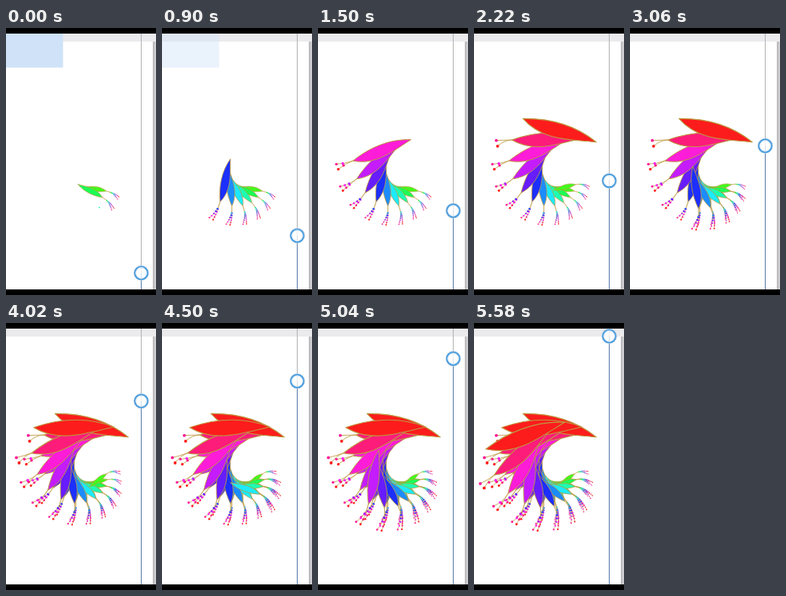
Recreate the animation shown at these times as an HTML page. Size 188 px wide and 334 px high, loop 5.64 s.

```html
<!DOCTYPE html>
<html lang="en">
<head>
<meta charset="utf-8">
<title>Feather spiral</title>
<style>
  html, body { margin: 0; width: 100%; height: 100%; overflow: hidden; background: #fff; }
  svg { display: block; width: 100vw; height: 100vh; }
</style>
</head>
<body>
<svg viewBox="0 0 188 334" preserveAspectRatio="none">
  <defs>
    <linearGradient id="edge">
      <stop offset="0" stop-color="#b4b4b6"/>
      <stop offset="1" stop-color="#d8d8da"/>
    </linearGradient>
    <filter id="soft" x="-30%" y="-30%" width="160%" height="160%">
      <feGaussianBlur stdDeviation="0.7"/>
    </filter>
  </defs>
  <rect width="188" height="334" fill="#fff"/>
  <rect y="7" width="188" height="10" fill="#ebeaed"/>
  <rect x="184" y="17" width="4" height="310" fill="url(#edge)"/>
  <rect id="panel" y="7" width="71.5" height="42.5" fill="#cfe2f8"/>
  <g id="feathers" stroke-linejoin="round"></g>
  <path d="M169.5 7V327" stroke="#b2b2b4"/>
  <path id="track" stroke="#587bab"/>
  <g id="knob">
    <circle r="8.8" fill="none" stroke="#b4cde6" stroke-width="1.8" filter="url(#soft)"/>
    <circle r="8" fill="#fff" fill-opacity=".75" stroke="#3d97dc" stroke-width="1.7"/>
    <circle r="6.6" fill="none" stroke="#d3e6f8"/>
  </g>
  <rect width="188" height="7" fill="#000"/>
  <rect y="327" width="188" height="7" fill="#000"/>
</svg>
<script>
const LOOP = 5640, STEP = 60, LAST = 10;
const GOLD = '#bd983f';
const CENTER = { x: 108, y: 188 };
// Each layer grows its leaves from tail to head, one per "pace" ms.
const LAYERS = [{ start: -513, pace: 233 }, { start: 2050, pace: 168 }, { start: 3898, pace: 150 }];

const byId = id => document.getElementById(id);
const feathers = byId('feathers'), panel = byId('panel'), knob = byId('knob'), track = byId('track');
const parts = [];

function add(tag, attrs, birth) {
  const el = document.createElementNS('http://www.w3.org/2000/svg', tag);
  for (const key in attrs) el.setAttribute(key, attrs[key]);
  feathers.appendChild(el);
  parts.push({ el, birth });
}

function polar(radius, degrees) {
  const a = degrees * Math.PI / 180;
  return [CENTER.x + radius * Math.cos(a), CENTER.y + radius * Math.sin(a)];
}

const xy = p => p[0].toFixed(2) + ' ' + p[1].toFixed(2);
const color = i => `hsl(${360 - 25 * i} 98% 55%)`;

// Leaf i of layer k: base, tip and hair end each follow their own shrinking spiral.
const leafPoints = (k, i) => ({
  base: polar(64 * .876 ** i, 315 - 20 * k - 17.5 * i),
  tip: polar((88 + 5 * k) * (.878 - .0165 * k) ** i, 238 - 20 * k - 19.6 * i),
  end: polar(96 + 5 * k - (5.5 + .8 * k) * i, 228 - 19 * k - 19.1 * i)
});

function leafPath(base, tip) {
  const dx = base[0] - tip[0], dy = base[1] - tip[1];
  const at = (along, side) => xy([tip[0] + dx * along + dy * side, tip[1] + dy * along - dx * side]);
  return `M${xy(tip)}C${at(.33, .11)} ${at(.67, .13)} ${xy(base)}` +
         `C${at(.67, -.07)} ${at(.33, -.2)} ${xy(tip)}Z`;
}

// Two bent strands with i dots each; the dots run through the leaf hues towards red.
function addHair(i, { base, tip, end }, birthAt) {
  const dx = end[0] - tip[0], dy = end[1] - tip[1], len = Math.hypot(dx, dy);
  const ax = tip[0] - base[0], ay = tip[1] - base[1], reach = len * .5 / Math.hypot(ax, ay);
  const ctrl = [tip[0] + ax * reach, tip[1] + ay * reach];
  for (const side of [1, -1]) {
    const gap = side * 4 * .92 ** i / len;
    const goal = [end[0] + dy * gap, end[1] - dx * gap];
    add('path', { d: `M${xy(tip)}Q${xy(ctrl)} ${xy(goal)}`, fill: 'none', stroke: GOLD,
      'stroke-width': .9 * .93 ** i }, birthAt(.5));
    for (let j = 1; j <= i; j++) {
      const p = .25 + .75 * j / i, q = 1 - p;
      const [cx, cy] = [0, 1].map(n => q * q * tip[n] + 2 * p * q * ctrl[n] + p * p * goal[n]);
      add('circle', { cx, cy, r: 2.2 * .87 ** i, fill: color(i - j + (side < 0 ? 1.3 : 0)) }, birthAt(p * .5));
    }
  }
}

LAYERS.forEach(({ start, pace }, k) => {
  for (let i = LAST; i >= 0; i--) {
    const points = leafPoints(k, i);
    const birthAt = f => start + (LAST - i + f) * pace;
    if (i) addHair(i, points, birthAt);
    add('path', { d: leafPath(points.base, points.tip), fill: color(i),
      stroke: GOLD, 'stroke-width': 1.1 * .95 ** i }, birthAt(.6));
  }
});

function stepped(ms) {
  const t = Math.floor(ms / STEP) * STEP;
  if (t < 180) return 0;
  return t >= 360 && t < 600 ? 360 : t;
}

function render(ms) {
  const t = stepped(ms % LOOP);
  for (const { el, birth } of parts) el.style.display = t >= birth ? '' : 'none';
  const fade = Math.max(0, t - 180) / 960;
  panel.setAttribute('opacity', Math.max(0, 1 - fade * fade));
  const y = 306.5 - t * 290 / 5580;
  knob.setAttribute('transform', `translate(169.5 ${y})`);
  track.setAttribute('d', `M169.5 ${y}V327`);
}

let origin;
function tick(now) {
  origin ??= now;
  render(now - origin);
  requestAnimationFrame(tick);
}
render(0);
requestAnimationFrame(tick);
</script>
</body>
</html>
```
